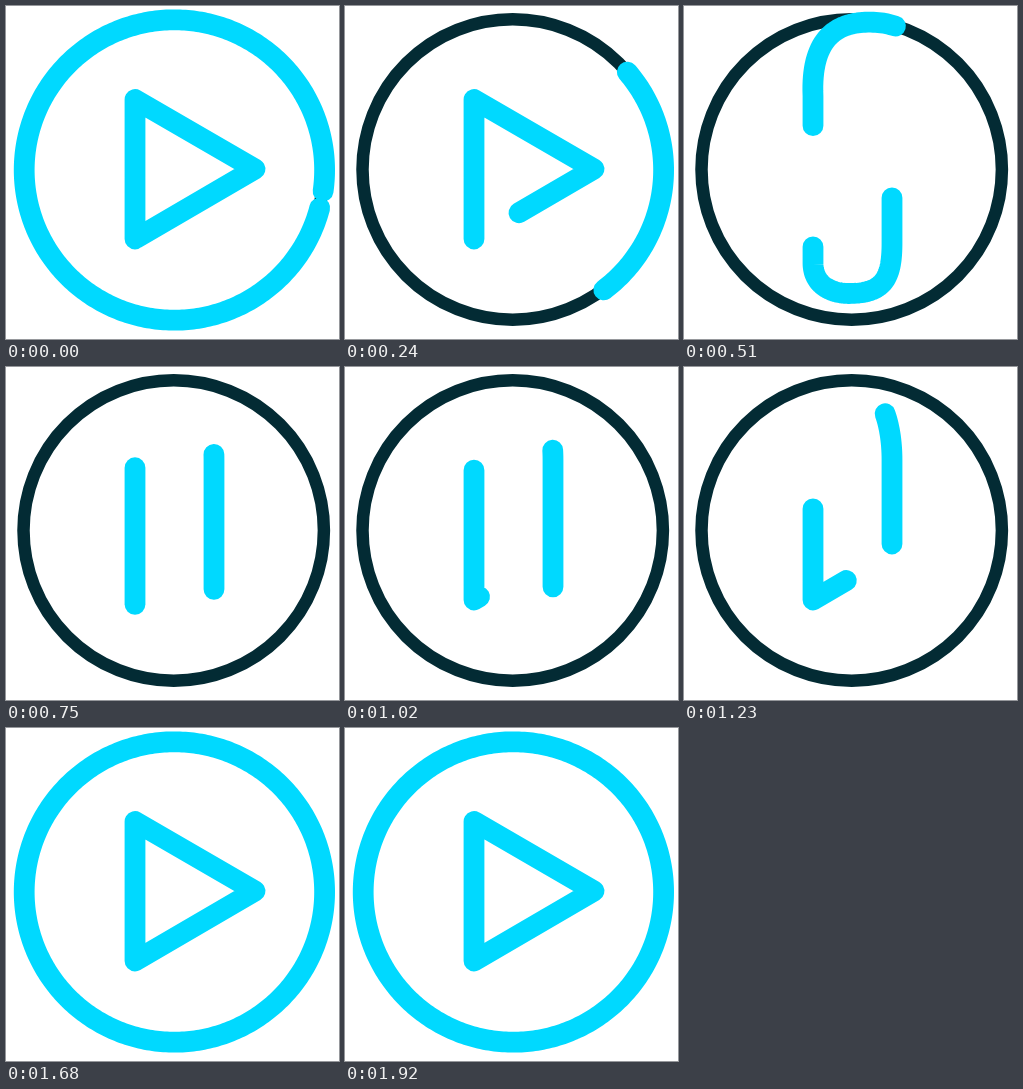
An HTML page with a canvas for the animation above (1950 ms loop, 333 by 333 pixels).

```html
<!DOCTYPE html>
<html lang="en">
<head>
<meta charset="utf-8">
<title>Play / pause</title>
<style>
html, body { margin: 0; width: 100%; height: 100%; overflow: hidden; background: #fff; }
canvas { display: block; width: 100vmin; height: 100vmin; }
</style>
</head>
<body>
<canvas id="stage"></canvas>
<script>
const SIZE = 333, LOOP = 1950, HALF = LOOP / 2, LEAD = 6;
const PRESS = 246, SPRING = 540;
const CYAN = '#00d9ff', DARK = '#032b34';
const CX = 168.4, CY = 164, R = 150.2, DEG = R * Math.PI / 180;
const LEFT = 129, RIGHT = 208, TOP = 93, BOTTOM = 231, BAR = BOTTOM - TOP;
const CORNER = [LEFT, 233], TIP = [249, 163], APEX = [LEFT, 93.5];

// A polyline measured by arc length
class Track {
  constructor(x, y) {
    this.pts = [{ x, y, s: 0 }];
  }
  get end() { return this.pts[this.pts.length - 1]; }
  get len() { return this.end.s; }
  line(x, y) {
    const p = this.end;
    this.pts.push({ x, y, s: p.s + Math.hypot(x - p.x, y - p.y) });
    return this;
  }
  curve(x1, y1, x2, y2, x3, y3) {
    const { x, y } = this.end;
    for (let i = 1; i <= 40; i++) {
      const t = i / 40, u = 1 - t;
      const a = u * u * u, b = 3 * u * u * t, c = 3 * u * t * t, d = t * t * t;
      this.line(a * x + b * x1 + c * x2 + d * x3, a * y + b * y1 + c * y2 + d * y3);
    }
    return this;
  }
  // counter-clockwise, in degrees from the right
  arc(from, to) {
    for (let a = from + 1; a <= to; a++) this.line(...onRing(a));
    return this;
  }
  triangle() { return this.line(...TIP).line(...APEX).line(...CORNER); }
  hook() {
    return this.line(LEFT, 257)
      .curve(LEFT, 278, 146, 287.5, 165, 287.5)
      .curve(200, 287.5, RIGHT, 272, RIGHT, 237);
  }
  draw(a, b) {
    a = Math.max(0, a);
    b = Math.min(this.len, b);
    if (b <= a) return;
    ctx.beginPath();
    for (let i = 1; i < this.pts.length; i++) {
      const p = this.pts[i - 1], q = this.pts[i];
      if (q.s < a || p.s > b || q.s === p.s) continue;
      const at = s => {
        const k = (s - p.s) / (q.s - p.s);
        return [p.x + (q.x - p.x) * k, p.y + (q.y - p.y) * k];
      };
      if (p.s <= a) ctx.moveTo(...at(a));
      ctx.lineTo(...at(Math.min(b, q.s)));
    }
    ctx.stroke();
  }
}

function onRing(deg) {
  const a = deg * Math.PI / 180;
  return [CX + R * Math.cos(a), CY - R * Math.sin(a)];
}

// Each move: [tail, head] at rest, pressed, just before release, and settled
function ringToLeftBar() {
  const track = new Track(...onRing(-16)).arc(-16, 438);
  track.curve(165, 13, 126, 20, LEFT, 90).line(LEFT, TOP);
  const s = track.len;
  track.line(...CORNER).hook().line(RIGHT, TOP);
  const pressed = [323 * DEG, 416.7 * DEG], wound = [329 * DEG, 414 * DEG];
  return { track, poses: [[0, 360 * DEG], pressed, wound, [s, s + BAR]] };
}

function triangleToRightBar() {
  const track = new Track(...CORNER).triangle();
  const full = track.len;
  track.hook().line(RIGHT, BOTTOM);
  const s = track.len;
  track.line(RIGHT, TOP).curve(RIGHT, 45, 190, 14, CX, CY - R).arc(90, 300);
  return { track, poses: [[0, full], [52, full], [72, full - 27], [s, s + BAR]] };
}

function leftBarToTriangle() {
  const track = new Track(LEFT, TOP).line(...CORNER);
  const corner = track.len;
  track.triangle();
  const lap = track.len - corner;
  track.triangle().triangle();
  const s = corner + lap * 2 / 3;
  const pressed = [49, corner + 39], wound = [47, corner + 33];
  return { track, poses: [[0, BAR], pressed, wound, [s, s + lap]] };
}

function rightBarToRing() {
  const track = new Track(RIGHT, BOTTOM).line(RIGHT, TOP);
  track.curve(RIGHT, 45, 190, 14, CX, CY - R);
  const s = track.len + 204.6 * DEG;
  track.arc(90, 900);
  const pressed = [54, BAR + 47];
  return { track, poses: [[0, BAR], pressed, pressed, [s, s + 360 * DEG]] };
}

const toPause = { release: 487.2, moves: [ringToLeftBar(), triangleToRightBar()] };
const toPlay = { release: 484.65, moves: [rightBarToRing(), leftBarToTriangle()] };

function elasticOut(t) {
  if (t >= 1) return 1;
  return 1 - Math.pow(2, -10 * t) * Math.sin((t + 0.075) * 2 * Math.PI / 0.3);
}

function blend(a, b, k) {
  return a.map((v, i) => v + (b[i] - v) * k);
}

function pose([rest, pressed, wound, settled], t, release) {
  if (t < PRESS) return blend(rest, pressed, t / PRESS);
  if (t < release) return blend(pressed, wound, (t - PRESS) / (release - PRESS));
  return blend(wound, settled, elasticOut((t - release) / SPRING));
}

const canvas = document.getElementById('stage');
const ctx = canvas.getContext('2d');

function resize() {
  const side = Math.min(innerWidth, innerHeight) || SIZE;
  canvas.width = canvas.height = Math.round(side * (devicePixelRatio || 1));
}

function render(time) {
  const k = canvas.width / SIZE;
  ctx.setTransform(k, 0, 0, k, 0, 0);
  ctx.fillStyle = '#fff';
  ctx.fillRect(0, 0, SIZE, SIZE);
  ctx.lineCap = ctx.lineJoin = 'round';

  ctx.strokeStyle = DARK;
  ctx.lineWidth = 12.5;
  ctx.beginPath();
  ctx.arc(167.7, 163.5, 150.2, 0, 2 * Math.PI);
  ctx.stroke();

  ctx.strokeStyle = CYAN;
  ctx.lineWidth = 20.8;
  const t = (time + LEAD) % LOOP;
  const { release, moves } = t < HALF ? toPause : toPlay;
  for (const { track, poses } of moves) track.draw(...pose(poses, t % HALF, release));
}

let start;
function tick(now) {
  if (start === undefined) start = now;
  render(Math.max(0, now - start));
  requestAnimationFrame(tick);
}

addEventListener('resize', () => { resize(); render(performance.now() - (start || 0)); });
resize();
render(0);
requestAnimationFrame(tick);
</script>
</body>
</html>
```
